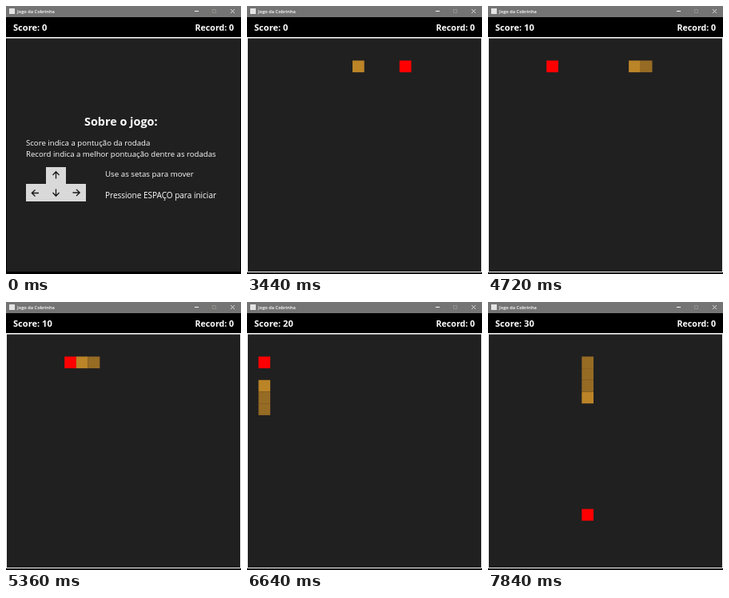
An HTML page with a canvas that plays this animation: 294 px wide and 336 px high, repeating every 8000 ms.

```html
<!DOCTYPE html>
<html lang="pt">
<head>
<meta charset="utf-8">
<title>Jogo da Cobrinha</title>
<style>
html, body { margin: 0; width: 100%; height: 100%; overflow: hidden; background: #000; }
canvas { display: block; width: 294px; height: 336px; }
</style>
</head>
<body>
<canvas id="stage" width="294" height="336"></canvas>
<script>
const ctx = document.getElementById('stage').getContext('2d');
const LOOP = 8000, START = 2640, CELL = 14.7, TOP = 39;
const HEAD = '#bb8427', BODY = '#966b24', FIELD = '#202020';
const FONT = '"Open Sans", "Noto Sans", sans-serif';

// Each turn: time in ms, then the cells travelled since the previous turn.
const MOVES = [
  [3440, 'DD'], [3520, 'D'], [3680, 'RR'], [3840, 'R'], [3920, 'R'], [4000, 'R'],
  [4160, 'R'], [4240, 'R'], [4320, 'U'], [4400, 'L'], [4560, 'L'], [4720, 'LL'],
  [4800, 'L'], [4880, 'L'], [5040, 'L'], [5120, 'L'], [5200, 'L'], [5360, 'L'],
  [5440, 'L'], [5520, 'L'], [5680, 'DD'], [5760, 'D'], [5920, 'D'], [6000, 'D'],
  [6160, 'L'], [6240, 'L'], [6400, 'L'], [6480, 'U'], [6560, 'U'], [6640, 'U'],
  [6800, 'UU'], [6960, 'R'], [7040, 'R'], [7120, 'R'], [7200, 'R'], [7360, 'R'],
  [7440, 'R'], [7600, 'R'], [7680, 'D'], [7760, 'D'], [7840, 'D']
];
const STEP = { U: [0, -1], D: [0, 1], L: [-1, 0], R: [1, 0] };
const FOOD = [[13, 2], [5, 2], [1, 2], [8, 15]];

function rect(x, y, w, h, color) {
  ctx.fillStyle = color;
  ctx.fillRect(x, y, w, h);
}

function text(str, x, y, size, weight = 400, align = 'left') {
  ctx.font = `${weight} ${size}px ${FONT}`;
  ctx.textAlign = align;
  ctx.fillStyle = '#fff';
  ctx.fillText(str, x, y);
}

function lines(color, width, ...paths) {
  ctx.strokeStyle = color;
  ctx.lineWidth = width;
  ctx.beginPath();
  for (const [first, ...rest] of paths) {
    ctx.moveTo(...first);
    rest.forEach(p => ctx.lineTo(...p));
  }
  ctx.stroke();
}

function cell([col, row], color) {
  rect(col * CELL - 0.3, TOP + row * CELL, CELL, CELL, color);
}

// Replays the game up to time t.
function play(t) {
  const snake = [[9, 0]];
  let eaten = 0;
  for (const [time, path] of MOVES) {
    if (time > t) break;
    for (const dir of path) {
      const [dx, dy] = STEP[dir];
      const [x, y] = [snake[0][0] + dx, snake[0][1] + dy];
      const [foodX, foodY] = FOOD[eaten];
      snake.unshift([x, y]);
      if (x === foodX && y === foodY) eaten++;
      else snake.pop();
    }
  }
  return { snake, eaten };
}

function drawWindow(score) {
  rect(0, 0, 294, 336, '#000');
  rect(0, 0, 294, 14, '#747474');
  rect(4, 3, 7, 7, '#e4e4e4');
  text('Jogo da Cobrinha', 14, 9, 5.7, 600);
  lines('#fff', 1, [[236, 6.5], [241, 6.5]]);
  lines('#92918e', 1, [[258.5, 4.5], [262.5, 4.5], [262.5, 8.5], [258.5, 8.5], [258.5, 4]]);
  lines('#f0f0f0', 0.8, [[281, 4], [286, 9]], [[286, 4], [281, 9]]);
  text(`Score: ${score}`, 9, 31, 11.1, 700);
  text('Record: 0', 285, 31, 10.6, 700, 'right');
}

function arrow(x, y, angle) {
  ctx.save();
  ctx.translate(x, y);
  ctx.rotate(angle);
  lines('#181818', 1.3, [[0, 4.5], [0, -4]], [[-4, 0], [0, -4.2], [4, 0]]);
  ctx.restore();
}

function drawIntro() {
  rect(1, 40, 292, 293, FIELD);
  rect(0, 39, 294, 1.5, '#fff');
  text('Sobre o jogo:', 98, 150, 14.4, 700);
  text('Score indica a pontução da rodada', 25, 175, 9.65);
  text('Record indica a melhor pontuação dentre as rodadas', 25, 189, 9.65);
  text('Use as setas para mover', 124, 214, 9.75);
  text('Pressione ESPAÇO para iniciar', 124, 241, 10);
  rect(50, 202, 25, 22, '#d9d9d9');
  rect(25, 223, 75, 22, '#d9d9d9');
  arrow(62.5, 212, 0);
  arrow(36.5, 234.5, -Math.PI / 2);
  arrow(62.5, 234, Math.PI);
  arrow(88, 234, Math.PI / 2);
}

function drawGame({ snake, eaten }) {
  rect(0, 40, 294, 294, FIELD);
  cell(FOOD[eaten], '#f00');
  snake.forEach((part, i) => cell(part, i ? BODY : HEAD));
  lines('#fff', 1, [[0.5, 40], [0.5, 333.5], [293.5, 333.5], [293.5, 40]]);
  rect(0, 39, 294, 1.5, '#fff');
}

function draw() {
  const t = performance.now() % LOOP;
  const game = play(t);
  drawWindow(game.eaten * 10);
  if (t < START) drawIntro();
  else drawGame(game);
  requestAnimationFrame(draw);
}

draw();
</script>
</body>
</html>
```
